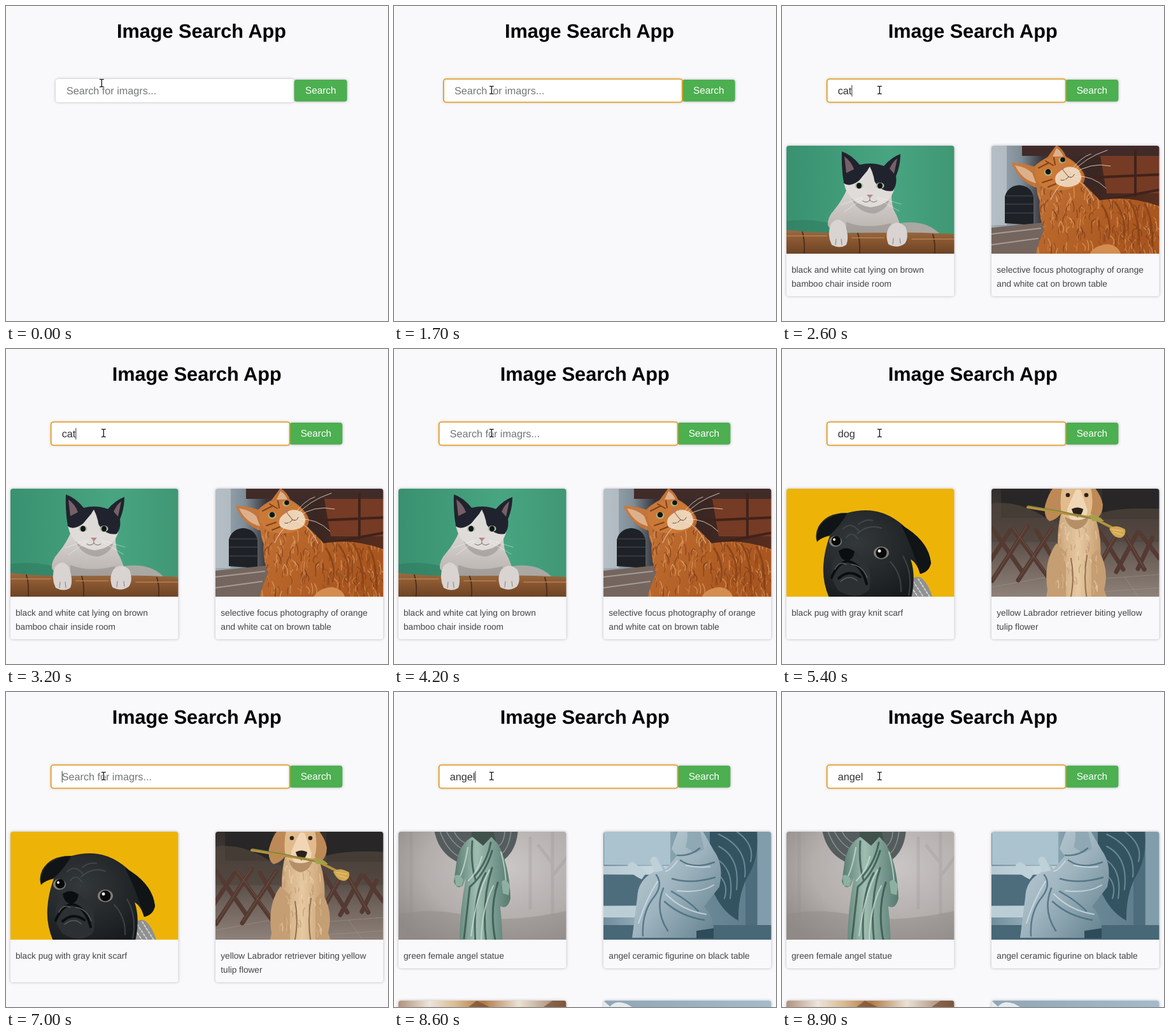
Write an HTML page that moves like this. It is 600 px wide and 496 px high and loops after 9000 ms.

```html
<!DOCTYPE html>
<html lang="en">
<head>
<meta charset="utf-8">
<title>Image Search App</title>
<style>
  html, body { margin: 0; width: 100%; height: 100%; overflow: hidden; background: #f9f8fb; }
  svg { display: block; width: 600px; height: 496px; font-family: "Liberation Sans", Arial, sans-serif; text-rendering: geometricPrecision; }
  .shadow { filter: drop-shadow(0 0 2px #0004); }
  .caption { font-size: 13.65px; fill: #444; }
  .photo { filter: blur(.6px); }
  .line { fill: none; stroke-linecap: round; stroke-linejoin: round; }
</style>
</head>
<body>
<svg viewBox="0 0 600 496">
  <defs>
    <clipPath id="frameL"><path d="M7 390V224a4 4 0 0 1 4-4H266.500a4 4 0 0 1 4 4V390Z"/></clipPath>
    <clipPath id="frameR"><path d="M329 390V224a4 4 0 0 1 4-4H588.500a4 4 0 0 1 4 4V390Z"/></clipPath>
    <clipPath id="frameL2"><rect x="7" y="486" width="263.500" height="30" rx="4"/></clipPath>
    <clipPath id="frameR2"><rect x="329" y="486" width="263.500" height="30" rx="4"/></clipPath>
    <linearGradient id="green"><stop stop-color="#38906f"/><stop offset=".6" stop-color="#48a581"/><stop offset="1" stop-color="#3f9673"/></linearGradient>
    <linearGradient id="bamboo" x2="0" y2="1"><stop stop-color="#9d6b42"/><stop offset=".4" stop-color="#86552f"/><stop offset="1" stop-color="#5f3a20"/></linearGradient>
    <linearGradient id="whiteFur" x2="0" y2="1"><stop stop-color="#dcd9d8"/><stop offset="1" stop-color="#b9b2ae"/></linearGradient>
    <linearGradient id="room"><stop stop-color="#a9b5bd"/><stop offset=".2" stop-color="#7e8c97"/><stop offset=".32" stop-color="#363439"/><stop offset=".6" stop-color="#3a2622"/><stop offset="1" stop-color="#5c2e1e"/></linearGradient>
    <linearGradient id="orange" x2="1" y2=".5"><stop stop-color="#c98046"/><stop offset=".5" stop-color="#b9662b"/><stop offset="1" stop-color="#a8551f"/></linearGradient>
    <radialGradient id="pug" cx=".35" cy=".35" r=".8"><stop stop-color="#33383b"/><stop offset=".6" stop-color="#202426"/><stop offset="1" stop-color="#121517"/></radialGradient>
    <linearGradient id="yard" x2="0" y2="1"><stop stop-color="#2f2b2a"/><stop offset=".35" stop-color="#47403c"/><stop offset=".65" stop-color="#6f625b"/><stop offset="1" stop-color="#94877f"/></linearGradient>
    <linearGradient id="golden"><stop stop-color="#c9a277"/><stop offset=".5" stop-color="#e6c9a2"/><stop offset="1" stop-color="#c79e70"/></linearGradient>
    <radialGradient id="mist" cx=".62" cy=".35" r=".75"><stop stop-color="#cbc7c6"/><stop offset=".6" stop-color="#b3aeac"/><stop offset="1" stop-color="#8e8987"/></radialGradient>
    <linearGradient id="robe"><stop stop-color="#587a6f"/><stop offset=".4" stop-color="#9fbdb1"/><stop offset="1" stop-color="#567a70"/></linearGradient>
    <linearGradient id="window"><stop stop-color="#6c8998"/><stop offset=".3" stop-color="#9db6c2"/><stop offset=".55" stop-color="#6d8a99"/><stop offset="1" stop-color="#587786"/></linearGradient>
    <linearGradient id="stone" x2="1" y2="1"><stop stop-color="#c5d4db"/><stop offset=".5" stop-color="#9eb4bf"/><stop offset="1" stop-color="#5f7d8b"/></linearGradient>
    <linearGradient id="warm"><stop stop-color="#a98570"/><stop offset=".2" stop-color="#eee4da"/><stop offset=".35" stop-color="#d9b98e"/><stop offset=".5" stop-color="#b07a45"/><stop offset=".7" stop-color="#ece2d4"/><stop offset="1" stop-color="#8a6146"/></linearGradient>
    <linearGradient id="sky"><stop stop-color="#8ea6b8"/><stop offset="1" stop-color="#a3bccd"/></linearGradient>
    <path id="tabby" d="M360 247Q378 246 396 253Q405 244 417 238Q425 227 431 219Q442 226 446 237Q462 245 472 260Q479 270 473 279Q488 294 499 306Q548 297 600 318V400H396Q402 374 412 352Q403 334 405 307Q400 297 400 286Q375 279 360 247Z"/>
    <clipPath id="tabbyClip"><use href="#tabby"/></clipPath>
    <path id="chest" d="M438 260Q431 290 434 325Q428 360 430 400H497Q496 360 500 330Q503 290 489 258Z"/>
    <clipPath id="chestClip"><use href="#chest"/></clipPath>
  </defs>

  <rect width="600" height="496" fill="#f9f8fb"/>

  <g id="header">
    <text x="307" y="49.800" font-size="30.600" font-weight="700" text-anchor="middle">Image Search App</text>
    <rect class="shadow" x="78" y="115" width="374.500" height="36.500" rx="4" fill="#fff"/>
    <rect class="shadow" x="452.700" y="116" width="83" height="34.500" rx="4" fill="#4caf50"/>
    <text x="494.200" y="138.300" font-size="15.300" fill="#fff" text-anchor="middle">Search</text>
    <rect id="ring" x="78" y="115" width="375" height="36.500" rx="4" fill="none" stroke="#e59a14" stroke-width="1.700"/>
    <text id="query" x="95" y="139" font-size="16.200"></text>
    <rect id="caret" y="124.500" width="1" height="18" fill="#333"/>
  </g>

  <g id="cat">
    <g class="shadow" fill="#f9f8fb"><rect x="7" y="220" width="263.500" height="237" rx="4"/><rect x="329" y="220" width="263.500" height="237" rx="4"/></g>
    <g clip-path="url(#frameL)"><g class="photo">
      <path fill="url(#green)" d="M0 210H280V400H0Z"/>
      <path fill="#2f795f" opacity=".5" d="M0 340Q50 330 100 350V370H0Z"/>
      <path fill="#aaa8a3" d="M185 342Q225 336 247 358L240 364H185Z"/>
      <path fill="url(#bamboo)" d="M0 352Q60 359 140 357T280 360V400H0Z"/>
      <path class="line" stroke="#50301c" stroke-width="2" d="M32 356q5 16 2 40M119 358q5 16 2 40M237 360q5 16 2 40"/>
      <path class="line" stroke="#b78555" stroke-width="2" opacity=".7" d="M8 362H70M110 365H160M204 367H270"/>
      <path fill="url(#whiteFur)" d="M104 284Q95 306 82 321Q71 333 72 345Q76 356 100 357H188Q185 337 175 320Q171 306 172 285Z"/>
      <path fill="#8e8986" opacity=".5" d="M107 296Q136 326 169 305Q163 323 144 327Q115 325 107 296ZM101 340Q130 352 171 342V357H101Z"/>
      <path fill="#e0dcda" d="M96 270Q99 310 139 317Q177 313 178 275L150 250H118Z"/>
      <path fill="#20232d" d="M94 229Q109 234 122 250Q142 245 160 252Q172 238 186 233Q186 251 179 268Q181 282 174 291Q159 294 148 280Q139 269 137 256Q130 264 121 275Q106 286 97 279Q93 254 94 229Z"/>
      <path fill="#766068" d="M98 237Q109 245 113 257L101 263ZM181 240Q174 245 169 256L176 264Z"/>
      <path fill="#dedad7" d="M138 253Q132 260 129 277L134 291H147Q146 268 138 253Z"/>
      <g fill="#a9bd9d"><ellipse cx="121" cy="283" rx="6.500" ry="5"/><ellipse cx="154" cy="283" rx="6.500" ry="5"/></g>
      <g fill="#101419"><ellipse cx="121" cy="283" rx="4" ry="4.500"/><ellipse cx="154" cy="283" rx="4" ry="4.500"/></g>
      <path fill="#b78a83" d="M133 297h10l-5 6Z"/>
      <path class="line" stroke="#786c69" d="M138 303v3q-6 5-11 1m11-1q5 5 11 1"/>
      <path class="line" stroke="#fff" stroke-width=".6" opacity=".7" d="M127 301L93 313M127 303L98 324M150 301L187 312M150 303L184 323"/>
      <path fill="#d9d4d1" d="M77 343Q89 329 99 344Q106 364 101 376Q91 383 78 376Q70 359 77 343ZM169 347Q182 335 194 348Q200 364 193 374Q181 383 167 375Q161 359 169 347Z"/>
      <path class="line" stroke="#867d78" d="M85 367l-1 9M93 367l1 9M175 366l-1 9M185 366l1 8"/>
    </g></g>
    <g clip-path="url(#frameR)"><g class="photo">
      <path fill="url(#room)" d="M320 210H600V400H320Z"/>
      <path fill="#bcc5cb" opacity=".75" d="M320 210H353V345H320Z"/>
      <path fill="#402b29" d="M377 210H600V236H377Z"/>
      <path fill="#753b24" d="M500 236H600V295H510Z"/>
      <path class="line" stroke="#41221b" stroke-width="4" d="M492 270L600 265M510 305L600 288M555 228V298"/>
      <path fill="#1e2227" d="M350 342V300Q355 283 373 282Q392 284 395 301V345Z"/>
      <path class="line" stroke="#4a5058" d="M352 299H394M351 312H395M351 326H395"/>
      <path fill="#74665e" d="M320 350L420 340V400H320Z"/>
      <path class="line" stroke="#a69c95" stroke-width="2" d="M329 359L406 350M329 376L402 366"/>
      <use href="#tabby" fill="url(#orange)"/>
      <g id="tabbyFur" clip-path="url(#tabbyClip)"></g>
      <path fill="#ddb08c" d="M366 251Q382 253 393 263L399 279Q377 274 366 251ZM431 224Q440 229 442 238L425 237Z"/>
      <path fill="#ca7937" d="M398 254Q415 235 443 237Q464 247 471 263Q476 276 461 284Q439 295 412 287Q396 277 398 254Z"/>
      <path class="line" stroke="#7f421d" stroke-width="2" d="M403 255l16-8M414 244l12 7M427 239l2 11M409 278l15-5M418 285l17-7"/>
      <path fill="#ecd2b5" d="M437 260Q449 248 465 257Q475 271 465 280Q449 290 431 280Q425 268 437 260Z"/>
      <g fill="#aeb079"><ellipse cx="418" cy="262" rx="6.500" ry="5.500"/><ellipse cx="440" cy="243" rx="5.500" ry="5"/></g>
      <g fill="#151412"><circle cx="418" cy="261" r="4.300"/><circle cx="441" cy="242" r="3.800"/></g>
      <path fill="#bd765c" d="M434 255l9-5-1 9Z"/>
      <path class="line" stroke="#69412f" d="M442 259l8 10q-6 7-12 5m12-5q7 3 9-4"/>
      <path class="line" stroke="#f4e6d7" stroke-width=".8" d="M455 263Q475 239 511 227M457 265Q484 245 516 252M459 268Q488 266 509 287M456 270Q477 278 490 306M445 273Q428 290 422 305M453 260Q469 238 485 233"/>
      <path fill="#d48d51" d="M480 400Q484 377 512 375Q534 378 533 400Z"/>
      <path class="line" stroke="#864017" stroke-width="3" opacity=".8" d="M503 314q16 24 10 52M523 309q19 25 14 58M546 307q15 25 15 68M570 312q13 25 12 66"/>
    </g></g>
    <g class="caption">
      <text x="15" y="420.300">black and white cat lying on brown</text><text x="15" y="442">bamboo chair inside room</text>
      <text x="337.300" y="420.300">selective focus photography of orange</text><text x="337.300" y="442">and white cat on brown table</text>
    </g>
  </g>

  <g id="dog">
    <g class="shadow" fill="#f9f8fb"><rect x="7" y="220" width="263.500" height="237" rx="4"/><rect x="329" y="220" width="263.500" height="237" rx="4"/></g>
    <g clip-path="url(#frameL)"><g class="photo">
      <path fill="#edb407" d="M0 210H280V400H0Z"/>
      <path fill="#8f9191" d="M198 375Q205 354 218 360Q231 369 239 400H190Z"/>
      <path class="line" stroke="#d0d0cd" stroke-width="2" stroke-dasharray="3 3" d="M206 366l20 30M214 362l19 30M203 375l14 20"/>
      <path fill="url(#pug)" d="M103 258Q140 248 169 263Q184 271 196 283Q231 305 234 337Q231 351 217 354Q212 337 202 331Q212 360 201 400H78Q63 371 65 341Q66 319 75 294Q61 297 55 304Q51 292 57 280Q70 257 103 258Z"/>
      <path fill="#111416" d="M55 302Q53 275 78 264Q91 258 102 259Q91 279 75 293Q63 296 55 302ZM187 277Q228 299 234 337Q231 351 217 354Q206 315 187 277Z"/>
      <path class="line" stroke="#454b4e" stroke-width="2" opacity=".8" d="M96 283q13-12 25 4M118 291q18-16 38-9M101 297q9-12 18 2M120 276q12-9 22-6M170 335q18 19 17 47M190 326q16 28 9 62"/>
      <path fill="#2c3032" d="M84 325Q103 306 124 326Q145 347 137 379Q119 397 89 381Q69 355 84 325Z"/>
      <path fill="#0b0e10" d="M89 318Q101 309 114 319Q112 332 102 334Q91 331 89 318Z"/>
      <path class="line" stroke="#0b0d0f" stroke-width="4" d="M103 334Q87 337 78 360M103 334Q125 338 133 370M89 361Q105 346 123 359"/>
      <path class="line" stroke="#555c60" stroke-width="1.500" d="M83 347Q90 333 101 339M109 339Q126 341 134 360M92 366Q106 354 118 365"/>
      <g fill="#817d76"><ellipse cx="84" cy="303" rx="10" ry="8.500"/><ellipse cx="156" cy="321" rx="12" ry="10"/></g>
      <g fill="#08090a"><circle cx="85" cy="302" r="7.500"/><circle cx="156" cy="321" r="8.500"/></g>
      <g fill="#f0f0ed"><circle cx="82" cy="300" r="2"/><circle cx="153" cy="318" r="2.500"/></g>
    </g></g>
    <g clip-path="url(#frameR)"><g class="photo">
      <path fill="url(#yard)" d="M320 210H600V400H320Z"/>
      <path fill="#282626" d="M344 210H420V266H344ZM503 210H600V268H503Z"/>
      <path fill="#52473e" opacity=".7" d="M320 245Q365 235 410 263T480 269T600 252V304H320Z"/>
      <path class="line" stroke="#a49a91" opacity=".5" d="M329 375L428 357M500 362L593 355M505 382L593 376M538 359L560 390"/>
      <path class="line" stroke="#543a32" stroke-width="7" d="M324 338L358 286M330 282L377 350M330 365L386 279M363 284L417 358M371 364L424 283M399 285L438 351M500 337L529 287M499 288L536 347M525 351L558 289M537 291L569 347M559 346L582 297M562 289L592 329"/>
      <path class="line" stroke="#81604f" stroke-width="1" opacity=".7" d="M331 363L385 278M363 282L416 354M372 361L424 282M501 335L528 285M537 290L568 344"/>
      <use href="#chest" fill="url(#golden)"/>
      <path fill="#c69e73" d="M431 306Q410 335 417 380L413 400H446V320ZM496 315Q515 346 506 379L513 400H486V325Z"/>
      <g id="goldenFur" clip-path="url(#chestClip)"></g>
      <path class="line" stroke="#936f4e" stroke-width="2" d="M454 330Q460 360 453 395M479 325Q473 360 479 395"/>
      <path fill="#bd8957" d="M439 210Q422 214 413 247Q411 265 420 271Q438 268 448 240L451 216ZM485 211Q501 228 504 245Q504 261 493 268Q481 259 476 232Z"/>
      <path fill="#e1bb8c" d="M442 210H483Q489 230 487 249Q484 273 462 281Q441 274 438 251Q436 231 442 210Z"/>
      <path fill="#f0d6b4" d="M462 221Q455 234 448 252Q448 268 463 274Q479 269 480 254Q475 240 469 222Z"/>
      <path fill="#b48f68" d="M444 264Q462 275 482 264Q478 281 462 284Q448 280 444 264Z"/>
      <g fill="#2b211c"><circle cx="449" cy="230" r="3.300"/><circle cx="478" cy="230" r="3.300"/><path d="M455 252Q464 247 473 252Q472 261 464 265Q457 261 455 252Z"/></g>
      <path class="line" stroke="#b7913e" stroke-width="4" d="M386 249L440 258L488 266L520 282"/>
      <path class="line" stroke="#778447" stroke-width="1.500" d="M387 247L440 256L494 269"/>
      <path fill="#a6a04a" d="M482 262Q496 260 506 271L488 271Z"/>
      <path fill="#d2a751" d="M514 283Q524 275 539 284Q541 293 533 297Q521 299 514 283Z"/>
      <path class="line" stroke="#f0cf82" d="M518 284L535 287M520 288L535 293"/>
    </g></g>
    <g class="caption">
      <text x="15" y="420.300">black pug with gray knit scarf</text>
      <text x="337.300" y="420.300">yellow Labrador retriever biting yellow</text><text x="337.300" y="442">tulip flower</text>
    </g>
  </g>

  <g id="angel">
    <g class="shadow" fill="#f9f8fb"><rect x="7" y="220" width="263.500" height="215" rx="4"/><rect x="329" y="220" width="263.500" height="215" rx="4"/><rect x="7" y="486" width="263.500" height="30" rx="4"/><rect x="329" y="486" width="263.500" height="30" rx="4"/></g>
    <g clip-path="url(#frameL)"><g class="photo">
      <path fill="url(#mist)" d="M0 210H280V400H0Z"/>
      <path class="line" stroke="#8f8987" stroke-width="5" opacity=".22" d="M249 210V350M249 270l-22-28M249 290l25-33M27 220V355M214 230V340"/>
      <path fill="#918b87" opacity=".5" d="M0 352Q55 338 115 352T280 343V400H0Z"/>
      <path fill="#555c5d" d="M62 210Q67 255 105 270L127 235L121 210ZM150 210L156 240L172 265Q195 247 195 210Z"/>
      <path class="line" stroke="#8b9291" stroke-width="1.500" d="M72 219Q84 252 106 261M82 219Q95 244 113 249M94 219Q103 238 121 240M184 219Q180 247 169 255M174 219Q173 240 160 245"/>
      <path fill="#40514b" d="M123 210H154L160 234L142 252L121 238Z"/>
      <path fill="url(#robe)" d="M123 228Q103 239 98 269L94 299Q99 312 108 305L113 292Q102 350 103 400H171Q169 340 162 306L163 335Q178 346 183 325Q181 270 163 239L153 228L140 242Z"/>
      <path class="line" stroke="#304f47" stroke-width="3" opacity=".75" d="M123 235Q120 268 128 296M152 237Q147 266 127 290M154 250Q144 285 119 307L110 388M144 285Q123 321 128 395M154 277Q137 330 145 395M163 300Q149 345 160 395"/>
      <path class="line" stroke="#c8ddd2" stroke-width="2" opacity=".8" d="M116 245Q111 275 104 290M138 259Q133 281 117 297M150 280Q129 320 121 384M156 305Q138 341 137 390M168 252Q176 280 176 307"/>
      <path fill="#8db0a2" d="M95 290Q101 284 109 296L106 306L97 305ZM169 299Q176 291 182 305L180 320L171 317Z"/>
    </g></g>
    <g clip-path="url(#frameR)"><g class="photo">
      <path fill="url(#window)" d="M320 210H600V400H320Z"/>
      <path fill="#abc3cf" d="M330 210H434V272H330Z"/>
      <path fill="#d6e3e8" opacity=".7" d="M320 274H434V287H320Z"/>
      <path fill="#4d6d7d" d="M320 288H400V336H320ZM552 210H570V400H552Z"/>
      <path fill="#819dab" d="M571 210H600V400H571Z"/>
      <path fill="#bbced6" d="M320 337H445V355H320Z"/>
      <path fill="#486777" d="M320 367H600V400H320Z"/>
      <path fill="#345361" d="M496 210H568Q576 251 559 285Q540 314 541 360Q511 344 496 301Z"/>
      <path class="line" stroke="#6b8a98" stroke-width="2" d="M510 224Q556 245 551 291M510 243Q544 260 538 311M507 263Q535 280 528 325M506 285Q527 300 519 325M531 215Q568 237 560 267"/>
      <path fill="url(#stone)" d="M450 210Q442 229 436 247L444 258L427 279L409 260L409 283Q383 295 382 324L374 387H501Q506 357 487 338L511 307Q519 272 502 249L480 210Z"/>
      <path fill="#8fa8b4" d="M458 210Q464 226 458 244L473 254L487 248L479 210Z"/>
      <path class="line" stroke="#486b7c" stroke-width="2.500" opacity=".8" d="M445 257Q465 259 480 246M450 265Q471 280 503 268M437 294Q466 303 504 292M412 288Q423 303 409 322Q389 346 391 384M423 309Q409 344 430 376M436 314Q463 329 478 345M425 330Q450 353 487 359"/>
      <path class="line" stroke="#d9e5eb" stroke-width="2" opacity=".7" d="M445 266Q433 282 427 282M459 273Q477 277 496 275M414 298Q396 326 384 364M445 313Q482 317 502 304M427 318Q452 344 490 350"/>
      <path fill="#bed0d8" d="M366 279Q367 266 376 268L397 284L389 295Q376 289 366 279ZM402 266Q405 256 413 261L423 281L410 284Z"/>
      <path fill="#2d4b59" d="M475 376L502 372V388H475Z"/>
    </g></g>
    <g class="caption"><text x="15" y="420.300">green female angel statue</text><text x="337.300" y="420.300">angel ceramic figurine on black table</text></g>
    <g clip-path="url(#frameL2)"><path fill="url(#warm)" d="M0 480H280V510H0Z"/><path fill="#784e32" opacity=".7" d="M117 496L130 486L150 496ZM235 496L249 486H270V496Z"/></g>
    <g clip-path="url(#frameR2)"><path fill="url(#sky)" d="M320 480H600V510H320Z"/><path fill="#e5ecef" d="M329 486L340 496H329ZM339 496Q347 484 365 491L374 496Z"/></g>
  </g>

  <g id="pointer" class="line">
    <path stroke="#fff" stroke-width="3" d="M-3-6h2l1 1 1-1h2M0-5V5M-3 6h2l1-1 1 1h2"/>
    <path stroke="#161616" stroke-width="1.300" d="M-3-6h2l1 1 1-1h2M0-5V5M-3 6h2l1-1 1 1h2"/>
  </g>
</svg>
<script>
const LOOP = 9000;
const byId = id => document.getElementById(id);
const [header, ring, query, caret, pointer] = ['header', 'ring', 'query', 'caret', 'pointer'].map(byId);

const typed = [[0, ''], [1900, 'c'], [2000, 'ca'], [2200, 'cat'], [3300, 'ca'], [3700, 'c'], [3800, ''],
  [4500, 'd'], [4800, 'do'], [4900, 'dog'], [5900, 'do'], [6100, 'd'], [6300, ''],
  [7100, 'a'], [7300, 'an'], [7400, 'ang'], [7500, 'ange'], [8300, 'angel']];
const results = [[0, ''], [2500, 'cat'], [5200, 'dog'], [8600, 'angel']];
const caretShown = [[900, 1700], [1900, 2700], [3200, 4200], [4500, 5400], [5900, 6500], [7000, 8000], [8300, 8800]];

const valueAt = (steps, t) => steps.findLast(([start]) => t >= start)[1];
const clamp = v => Math.max(0, Math.min(1, v));

// Fine hair strokes, spread at random but always the same.
function addFur(id, count, [x, y, w, h], colors, length) {
  let seed = 7;
  const random = () => (seed = seed * 16807 % 2147483647) / 2147483647;
  let strokes = '';
  for (let i = 0; i < count; i++) {
    const dx = (random() - .5) * length, dy = length * (.4 + random() * .6);
    strokes += `<path class="line" stroke="${colors[i % colors.length]}" opacity=".6" stroke-width="1.5"
      d="M${x + random() * w} ${y + random() * h}q${dx} ${dy / 2} ${dx / 2} ${dy}"/>`;
  }
  byId(id).innerHTML = strokes;
}
addFur('tabbyFur', 240, [395, 280, 205, 105], ['#e5a868', '#8b431b', '#d28645', '#6f3518'], 20);
addFur('goldenFur', 70, [432, 265, 66, 110], ['#f0d8b6', '#bc9167', '#dfbb8c'], 13);

function draw(t) {
  const shown = valueAt(results, t), text = valueAt(typed, t);
  for (const name of ['cat', 'dog', 'angel']) byId(name).style.display = name === shown ? '' : 'none';
  header.setAttribute('transform', `translate(${shown ? -7.3 : 0})`);
  ring.setAttribute('opacity', clamp((t - 800) / 300) * (t >= 900));
  query.textContent = text || 'Search for imagrs...';
  query.setAttribute('fill', text ? '#333' : '#727776');
  caret.setAttribute('x', 95 + (text ? query.getComputedTextLength() : 0));
  caret.style.display = caretShown.some(([from, to]) => t >= from && t < to) ? '' : 'none';
  const move = clamp((t - 1300) / 200) * (t >= 1400);
  pointer.setAttribute('transform', `translate(${150.3 + 3 * move} ${121.3 + 11 * move})`);
}

const start = performance.now();
function tick() {
  draw((performance.now() - start) % LOOP);
  requestAnimationFrame(tick);
}
tick();
</script>
</body>
</html>
```
